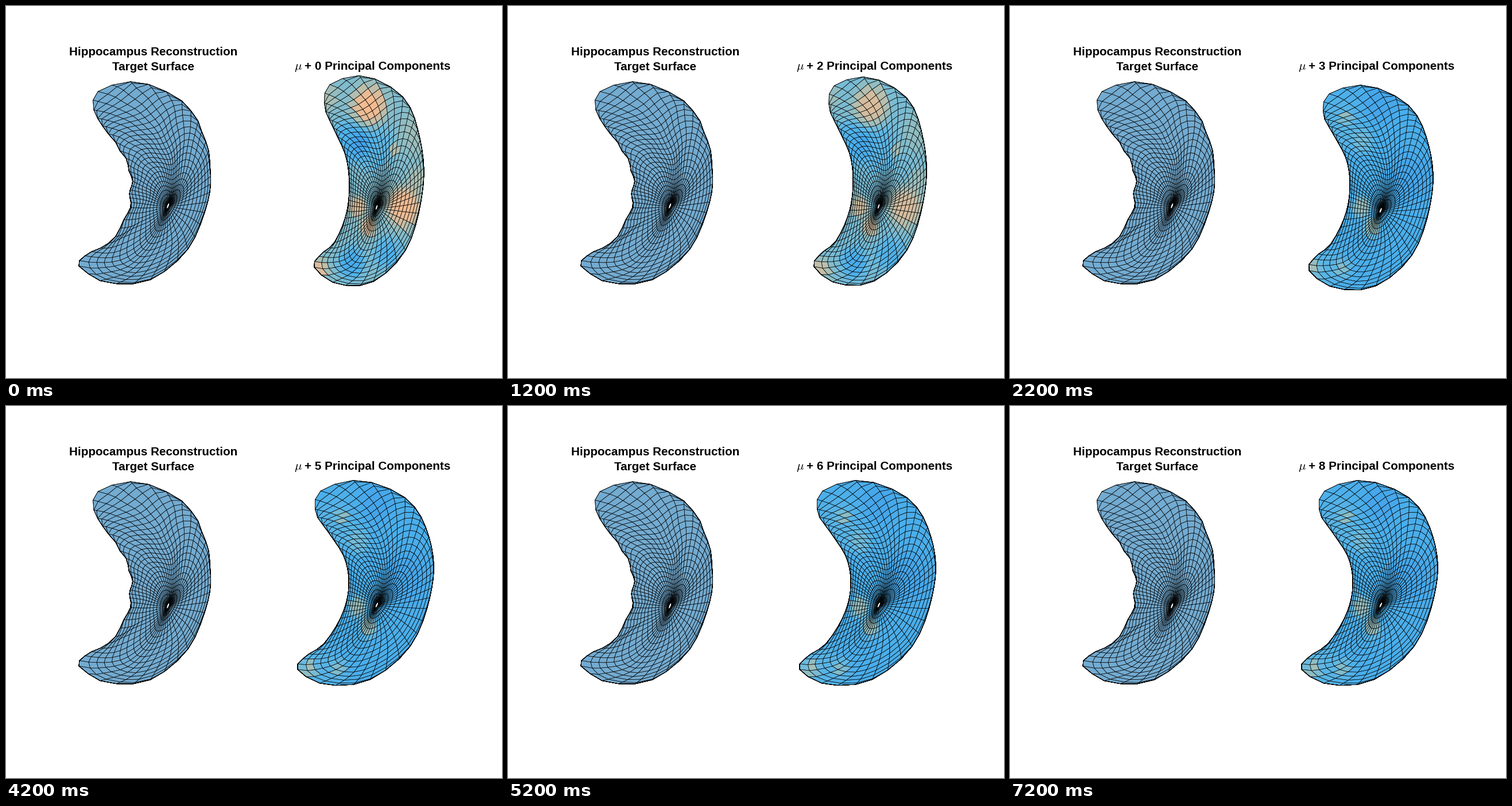
Write a matplotlib script that moves like this. It is 864 px wide and 648 px high and loops after 8000 ms.

```python
import numpy as np
import matplotlib.pyplot as plt
from matplotlib.animation import FuncAnimation
from matplotlib.collections import PolyCollection
from matplotlib.colors import LinearSegmentedColormap

W, H = 864, 648
STEP = 200
FRAMES = 40
MERIDIANS, RINGS = 56, 28

# Mean outline: knots from the middle of the right side over the top.
MEAN = (np.array([727, 719, 691, 625, 564, 555, 570, 592, 598, 592, 572, 548, 537, 577, 640, 700])
        + 1j * np.array([310, 222, 158, 122, 137, 175, 212, 262, 315, 365, 412, 433, 455, 484, 480, 418]))

# How far the right, top, left and bottom of the outline move as components are added.
COUNTS = [0, 2, 3, 4, 5]
MOVES = np.array([[0, 0, 0, 0],
                  [1, 4 + 2j, 3 - 2j, -4 - 1j],
                  [9 + 10j, -8 + 16j, -6 + 3j, -16 + 6j],
                  [14 + 8j, -12 + 15j, -2 + 3j, -25 + 10j],
                  [17 - 8j, -16 + 11j, -1, -29 + 4j]])
TARGET_MOVE = [-371, -403 + 12j, -379 + 5j, -409 - 2j]

# Patches of error: x, y, radius, strength.
SHARED = [(612, 350, 16, .4), (631, 385, 15, .4)]
EARLY = [(632, 174, 31, .52), (676, 250, 9, .35), (693, 350, 31, .5), (718, 300, 18, .2),
         (545, 460, 17, .4), (560, 160, 18, .2), (600, 235, 32, -.26), (640, 245, 36, -.18),
         (602, 448, 24, -.3), (664, 432, 24, -.24), (722, 220, 36, .14)]
LATE = [(528, 456, 13, .36), (580, 457, 13, .26), (584, 194, 10, .3), (614, 236, 18, .2),
        (545, 455, 36, .08), (575, 205, 40, .08), (645, 170, 30, -.06), (695, 300, 40, -.06)]

CMAP = LinearSegmentedColormap.from_list("error", [
    "#3d99ea", "#4bafeb", "#69bae0", "#8dbdc4", "#b0bfb3", "#d9bd9d", "#ffba8c"])

tau = np.linspace(0, 2 * np.pi, MERIDIANS + 1)
phi = tau - .25 * np.sin(2 * tau)
# Fewer rings fit between the pole and the sides than towards the tips.
visible = 14 + 8 * np.sin(phi) ** 2 + 5 * np.sin(phi) ** 3
ring = np.clip(np.arange(RINGS + 1)[:, None] / visible, 0, 1)
rho = .025 + .975 * (.5 * ring ** 1.5 + .5 * np.sin(np.pi * ring / 2) ** 2)


def move_outline(moves):
    """Spread the four moves smoothly around the mean outline."""
    angle = np.arange(16) * np.pi / 8
    gap = angle[:, None] - np.arange(4) * np.pi / 2
    return MEAN + (1 + 2 * np.cos(gap) + np.cos(2 * gap)) @ np.array(moves) / 4


def outline_at(pts, angle):
    """Closed Catmull-Rom curve through the knots."""
    n = len(pts)
    s = angle / (2 * np.pi) * n
    i = np.floor(s).astype(int)
    f = s - i
    a, b, c, d = (pts[(i + k) % n] for k in (-1, 0, 1, 2))
    return b + .5 * f * (c - a + f * (2 * a - 5 * b + 4 * c - d + f * (3 * (b - c) + d - a)))


def sides(pts, v):
    a = np.arcsin(v)
    return outline_at(pts, np.pi - a), outline_at(pts, a)


def mesh(pts, pole_x, pole_v):
    """Polar grid on a disk, bent into the outline along its chords."""
    left, right = sides(pts, np.array(pole_v))
    u = 2 * (pole_x - left.real) / (right.real - left.real) - 1
    pole = u * np.sqrt(1 - pole_v ** 2) + 1j * pole_v
    d = rho * (np.exp(1j * phi) - pole)
    w = pole + d + .4 * d.imag * (1 - rho) ** 4
    v = np.clip(w.imag, -1, 1)
    half = np.maximum(np.sqrt(1 - v ** 2), 1e-6)
    t = .5 + .5 * np.clip(w.real / half, -1, 1)
    left, right = sides(pts, v)
    return left + (right - left) * t


def crumple(z):
    """Uneven surface with a crease at the lower left."""
    x, y = z.real, z.imag
    inner = np.clip((285 - x) / 70, 0, 1) * np.exp(-((y - 320) / 75) ** 2)
    z = z + inner * 3 * np.sin(y / 7 + x / 15) + np.sin(x / 9 + y / 13)
    along = (-58 + 42j) / abs(-58 + 42j)
    q = (z - (211 + 393j)) / along
    pull = .75 * q.imag * np.exp(-(q.imag / 11) ** 2 - (q.real / 38) ** 2)
    return z - 1j * pull * along


def quads(z):
    cells = np.stack([z[:-1, :-1], z[1:, :-1], z[1:, 1:], z[:-1, 1:]], -1)
    cells = cells.reshape(-1, 4)
    return np.stack([cells.real, cells.imag], -1)


def patches(cells, spots):
    x, y = cells.mean(1).T
    return sum(amp * np.exp(-(((x - px) / r) ** 2 + ((y - py) / r / 1.2) ** 2) ** 2)
               for px, py, r, amp in spots)


def surface(n):
    moves = [np.interp(n, COUNTS, column) for column in MOVES.T]
    cells = quads(mesh(move_outline(moves), 645, -.2))
    early = np.interp(n, [0, 2, 3], [1, .85, 0])
    val = (.16 + .28 * early + patches(cells, SHARED)
           + early * patches(cells, EARLY) + (1 - early) * patches(cells, LATE))
    return cells, CMAP(np.clip(val, 0, 1))


plt.rcParams["mathtext.fontset"] = "cm"
fig = plt.figure(figsize=(W / 72, H / 72), dpi=72, facecolor="white")
ax = fig.add_axes([0, 0, 1, 1])
ax.set_xlim(0, W)
ax.set_ylim(H, 0)
ax.axis("off")

states = [surface(n) for n in range(9)]
style = dict(edgecolors="black", linewidths=.7, joinstyle="round")
target = quads(crumple(mesh(move_outline(TARGET_MOVE), 281, -.17)))
ax.add_collection(PolyCollection(target, facecolors="#73abd1", **style))
model = PolyCollection(states[0][0], **style)
ax.add_collection(model)

font = dict(family="Liberation Sans", weight="bold", size=20.6, va="baseline")
ax.text(256.5, 85.5, "Hippocampus Reconstruction", ha="center", **font)
ax.text(256.5, 112, "Target Surface", ha="center", **font)
ax.text(502.5, 111, r"$\mu$", size=21, va="baseline")
title = ax.text(520.5, 111, "", ha="left", **font)


def update(frame):
    n = (frame * STEP + 800) // 1000
    cells, colors = states[n]
    model.set_verts(cells)
    model.set_facecolor(colors)
    title.set_text(f"+ {n} Principal Components")
    return model, title


anim = FuncAnimation(fig, update, frames=FRAMES, interval=STEP, repeat=True, repeat_delay=0)
plt.show()
```
